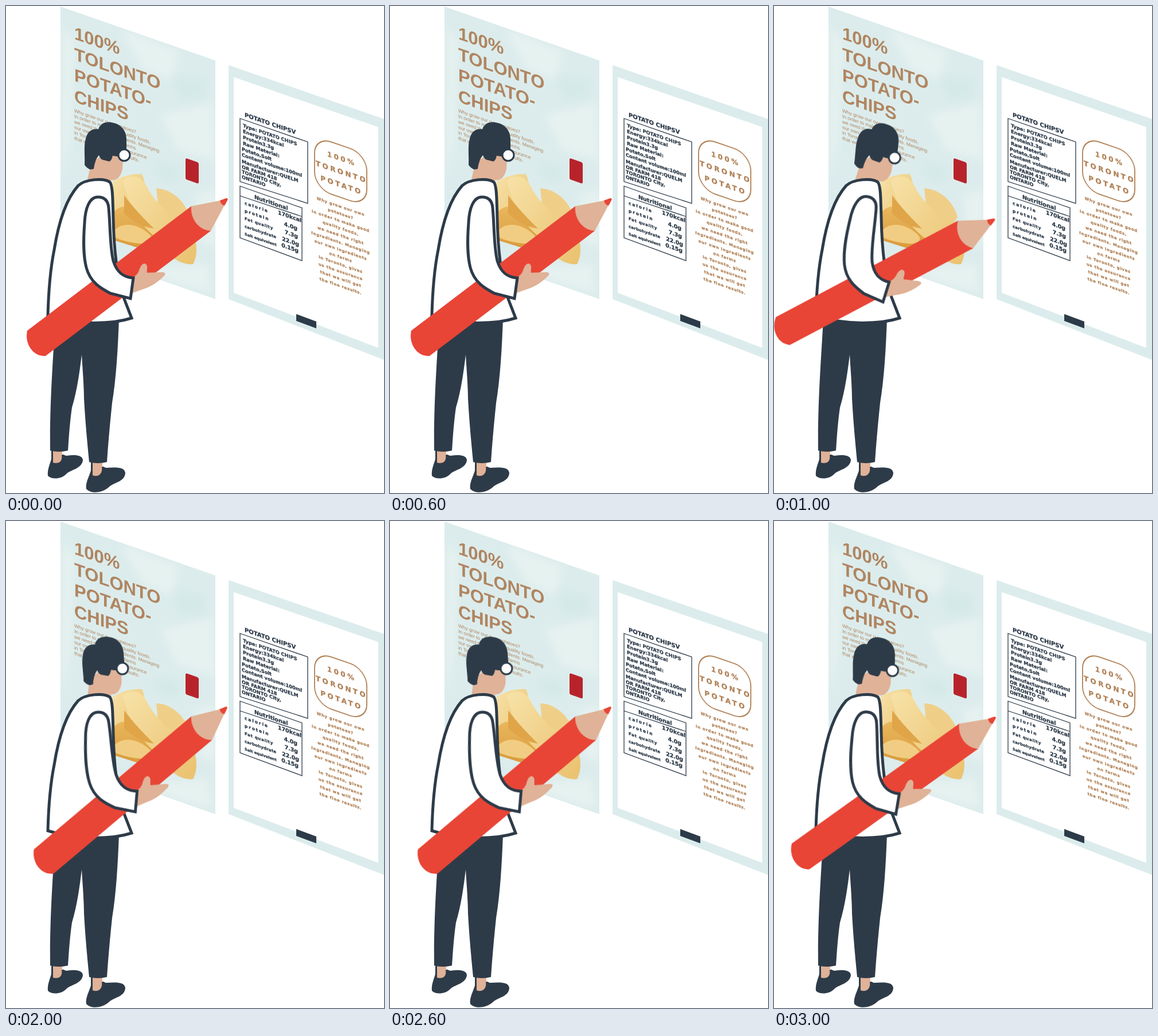
Animation, 659 px wide and 849 px high, one loop 4000 ms. Source, as an HTML page:

```html
<!DOCTYPE html>
<html lang="en">
<head>
<meta charset="utf-8">
<title>Package design</title>
<style>
  html, body { margin: 0; width: 100%; height: 100%; overflow: hidden; background: #fff; }
  svg { display: block; width: 100%; height: 100%; }
  .sans { font-family: "Liberation Sans", Arial, sans-serif; fill: #b08560; }
  .title { font-weight: 700; }
  .label { font-family: "DejaVu Sans", sans-serif; font-weight: 700; fill: #2d3b49; stroke: #2d3b49; stroke-width: .3px; }
  .tan { fill: #b08055; stroke: #b08055; }
  .rule { fill: none; stroke: #2d3b49; stroke-width: 1.3; }
  .navy { fill: #2d3b49; }
  .skin { fill: #e0b297; }
  .red { fill: #e84536; }
  .coat { fill: #fff; stroke: #2d3b49; stroke-width: 5; }
  #head { transform-origin: 165px 303px; }
  #arm { transform-origin: 166px 347px; }
</style>
</head>
<body>
<svg viewBox="0 0 659 849" preserveAspectRatio="none">
  <defs>
    <clipPath id="sheet"><path d="M95 1 365 95V511L95 417Z"/></clipPath>
    <filter id="soft" x="-50%" y="-50%" width="200%" height="200%"><feGaussianBlur stdDeviation="7"/></filter>
    <linearGradient id="chipA" x1="0" y1="0" x2="1" y2="1">
      <stop offset="0" stop-color="#f7e2a8"/><stop offset="1" stop-color="#eac16e"/>
    </linearGradient>
    <linearGradient id="chipB" x1="0" y1="0" x2="0" y2="1">
      <stop offset="0" stop-color="#e9b75c"/><stop offset="1" stop-color="#d9983a"/>
    </linearGradient>
  </defs>

  <!-- front poster -->
  <g clip-path="url(#sheet)">
    <path d="M95 0H365V511H95Z" fill="#dcecec"/>
    <g filter="url(#soft)" fill="#e6f2f0">
      <path d="M200 40 300 80 290 130 240 110Z"/>
      <path d="M270 190 360 170 365 270 300 250Z"/>
      <path d="M100 40 118 60 112 230 98 300Z"/>
      <path d="M330 330 365 320V420L340 410Z"/>
      <path d="M230 460 350 450 360 500 300 485Z"/>
    </g>
    <g filter="url(#soft)" fill="#d6e9e9">
      <path d="M290 120 350 130 340 165 300 160Z"/>
      <path d="M255 270 305 280 300 310 265 300Z"/>
    </g>
  </g>
  <g>
    <path d="M186 306C200 298 216 292 237 293C246 312 240 338 230 358L190 400Z" fill="url(#chipA)"/>
    <path d="M187 360C205 340 222 352 246 376C262 386 282 396 284 412L250 428C225 420 200 412 187 408Z" fill="url(#chipB)"/>
    <path d="M262 318C286 318 312 338 320 368L300 400 268 380Z" fill="#efcf88"/>
    <path d="M204 305C214 293 232 296 242 308C258 342 284 366 316 384C334 400 336 432 326 450C300 452 276 430 262 404C236 384 214 350 204 305Z" fill="url(#chipA)"/>
    <path d="M188 392C204 374 232 380 252 400C260 410 246 416 232 414C214 412 198 408 188 402Z" fill="#f0cd82"/>
    <path d="M206 330C222 352 238 368 258 388C240 386 222 376 206 362Z" fill="#dfa548"/>
  </g>
  <rect width="23" height="37" rx="3" transform="matrix(1 .345 0 1 313 265)" fill="#b8232b"/>

  <!-- back panel -->
  <path d="M388 103 659 197V617L388 511Z" fill="#dcecec"/>
  <path d="M397 124 649 211V596L397 500Z" fill="#fff"/>
  <path class="rule" d="M408 196 526 237V344L408 306ZM408 314 516 352V444L408 404ZM408 331 516 367"/>
  <rect width="91" height="91" rx="29" transform="matrix(1 .345 0 1 538 227)" fill="none" stroke="#b08055" stroke-width="1.8"/>
  <path class="navy" d="M506 537 541 550V562L506 549Z"/>
  <g id="copy"></g>

  <!-- legs and shoes -->
  <path class="skin" d="M82 770H98V800L82 798ZM151 790H168V825L151 818Z"/>
  <path class="navy" d="M79 774H82V800H79ZM148 794H151V820H148Z"/>
  <path class="navy" d="M79 790C76 800 72 808 73 819C80 826 96 825 105 816C113 808 132 807 134 792C134 782 118 782 106 784C102 784 100 780 97 783C99 794 92 799 82 796Z"/>
  <path class="navy" d="M148 810C145 820 138 832 140 842C148 851 168 849 179 839C188 830 207 830 208 814C207 803 190 804 176 805C172 806 170 801 167 804C169 816 160 822 151 818Z"/>
  <path class="navy" d="M86 545C82 620 76 690 77 775Q92 779 108 775C110 745 112 720 115 700C124 670 128 640 132 608C134 640 136 665 136 685C138 720 141 755 145 795Q160 799 176 795C178 765 181 730 185 692C192 650 195 600 197 545Z"/>

  <g id="head">
    <path class="skin" d="M148 275 140 312H184L183 303C193 306 201 296 203 284L204 265 180 250Z"/>
    <path class="navy" d="M147 285Q141 283 137 277C138 262 135 246 139 231C142 219 150 213 161 215C164 205 173 201 184 203C203 206 211 220 210 236V252L198 263 186 261Q184 270 180 271L168 268Q164 266 162 260Q155 268 153 284Z"/>
    <circle cx="206" cy="260" r="10" fill="#fff" stroke="#2d3b49" stroke-width="3"/>
  </g>

  <path class="coat" d="M73 540C74 500 76 465 84 425C92 375 106 335 126 313C138 302 170 299 181 307C186 313 186 335 187 370C188 420 193 470 205 508L219 544C185 555 125 557 73 540Z"/>

  <g id="arm">
    <path class="red" d="M37 566 323 349 357 392 69 610C48 612 32 590 37 566Z"/>
    <path class="skin" d="M323 349 374 339 381 347 357 392C336 391 321 371 323 349Z"/>
    <path class="red" d="M373 339 384 335Q388 335 386 339L381 348Q374 346 373 339Z"/>
    <path class="skin" d="M219 474Q229 470 232 461C235 451 240 447 244 450C248 454 245 460 246 465L272 464C279 464 279 468 274 472C264 482 252 490 238 494L216 502Z"/>
    <path class="coat" d="M160 333C146 333 138 352 137 378C135 405 134 432 140 456C147 482 165 492 182 501L217 510 222 474C204 473 193 464 187 444C181 420 182 385 179 352C178 339 171 333 160 333Z"/>
  </g>
</svg>
<script>
const NS = "http://www.w3.org/2000/svg";
const SLOPE = 0.345;
const copy = document.getElementById("copy");

// One line of text, sheared along the panel from (x, y).
function line(str, x, y, size, cls = "label", anchor = "start", gap = 0) {
  const t = document.createElementNS(NS, "text");
  t.setAttribute("class", cls);
  t.setAttribute("transform", `matrix(1 ${SLOPE} 0 1 ${x} ${y})`);
  t.setAttribute("font-size", size);
  t.setAttribute("text-anchor", anchor);
  if (gap) t.setAttribute("letter-spacing", gap);
  t.textContent = str;
  copy.append(t);
}

["100%", "TOLONTO", "POTATO-", "CHIPS"]
  .forEach((s, i) => line(s, 119, 57.5 + i * 36.5, 31, "sans title"));

["Why grow our own potatoes?",
 "In order to make good quality foods,",
 "we need the right ingredients. Managing",
 "our own ingredients on farms",
 "in Toronto, gives us the assurance",
 "that we will get the fine results."]
  .forEach((s, i) => line(s, 119, 185 + i * 9.6, 8.35, "sans"));

line("POTATO CHIPSV", 416, 193, 10);
[["Type: POTATO CHIPS", 211], ["Energy:334kcal", 221], ["Protein3.3g", 231.5],
 ["Raw Material:", 242], ["Potato,Solt", 252], ["Content volume:100ml", 262],
 ["Manufacturer:QUELM", 273.5], ["OR FARM 418", 283], ["TORONTO City,", 291.5],
 ["ONTARIO", 300.5]]
  .forEach(([s, y], i) => line(s, i < 4 ? 413 : 411, y, 8.2));

line("Nutritional", 433, 336, 9.6);
[["calorie", 7.5, 1.9, "170kcal", 515, 377],
 ["protein", 7.5, 1.8, "4.0g", 508, 391],
 ["Fat quality", 7, 0.7, "7.3g", 509, 405],
 ["carbohydrate", 7, 0.2, "22.0g", 511, 419],
 ["Salt equivalent", 6.5, 0, "0.15g", 510, 430]]
  .forEach(([name, size, gap, value, x, y], i) => {
    line(name, 416, 346 + i * 13.4, size, "label", "start", gap);
    line(value, x, y, 9.4, "label", "end");
  });

["100%", "TORONTO", "POTATO"]
  .forEach((s, i) => line(s, 585, 270.5 + i * 23, 12, "label tan", "middle", 3.4));

["Why grow our own", "potatoes?", "In order to make good", "quality foods,",
 "we need the right", "Ingredients. Managing", "our own ingredients", "on farms",
 "in Toronto, gives", "us the assurance", "that we will get", "the fine results."]
  .forEach((s, i) => line(s, 583.5, 352 + i * 12.6, 6.8, "label tan", "middle", 0.75));

// Each pose holds for a second, then snaps to the next.
const poses = { head: [0, 6, -4, 0.7], arm: [0, 9.3, -3, 1.6] };
for (const [id, angles] of Object.entries(poses)) {
  const steps = [...angles, angles[0]].map((a, i) => ({
    offset: i / angles.length, transform: `rotate(${a}deg)`, easing: "steps(1, end)"
  }));
  document.getElementById(id).animate(steps, { duration: 4000, iterations: Infinity });
}
</script>
</body>
</html>
```
